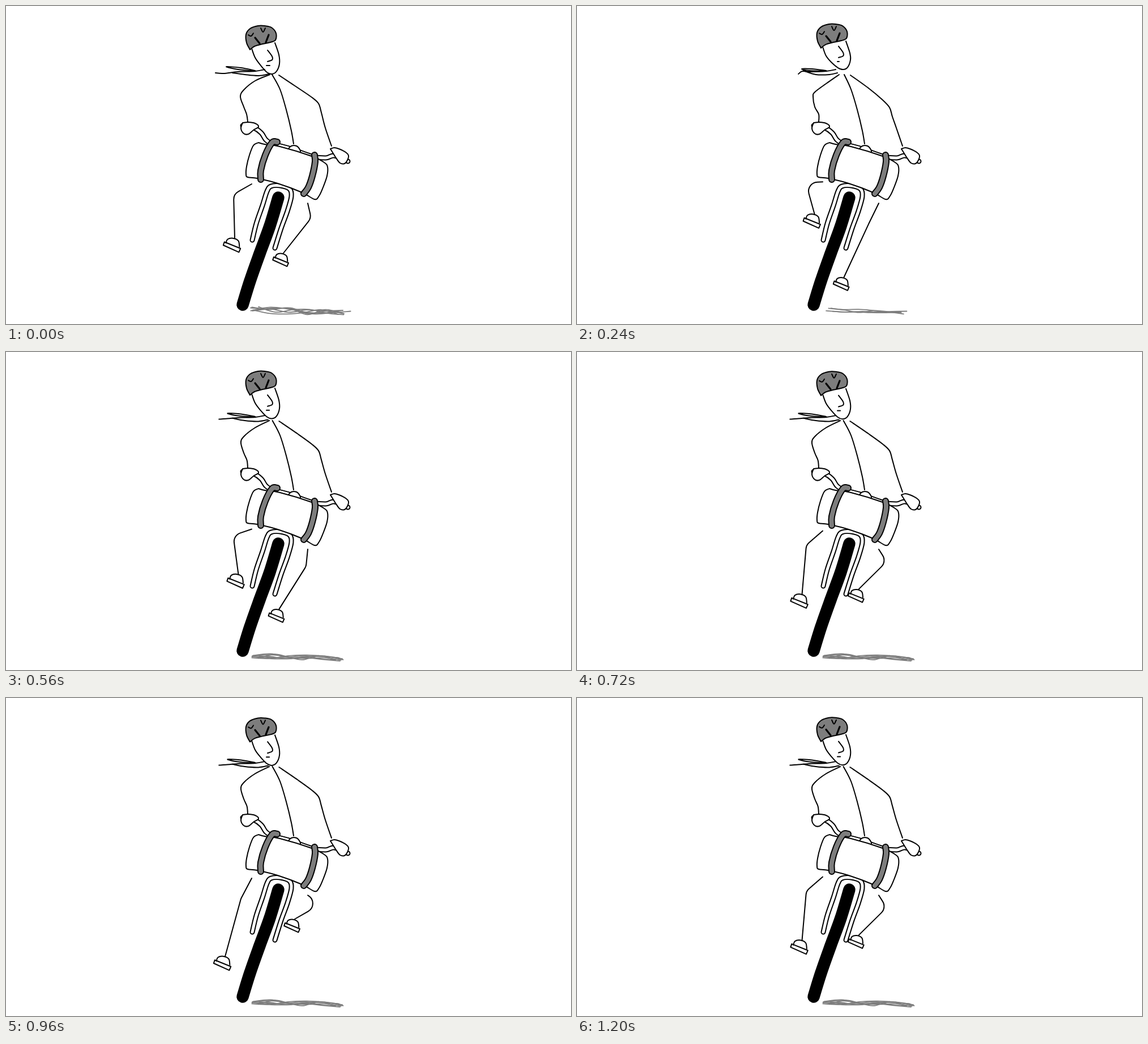
Animation, 998 px wide and 561 px high, one loop 1300 ms. Source, as an HTML page with a canvas:

```html
<!DOCTYPE html>
<html lang="en">
<head>
<meta charset="utf-8">
<title>Cyclist</title>
<style>
html, body { margin: 0; height: 100%; overflow: hidden; background: #fff; }
canvas { display: block; }
</style>
</head>
<body>
<canvas id="stage" width="998" height="561"></canvas>
<script>
const ctx = document.getElementById('stage').getContext('2d');
const GREY = '#7d7d7d';
const STEP = 80, LOOP = 1300, STEPS = 16;

// How far the redrawn lines drift from the first drawing, step by step.
const drift = [0, .3, 0, 1, .3, 1, 0, .3];

const points = s => s.split(' ').map(p => p.split(',').map(Number));

// Smooth path through all points of "x,y x,y ...".
function trace(p) {
  ctx.beginPath();
  ctx.moveTo(...p[0]);
  for (let i = 0; i < p.length - 1; i++) {
    const a = p[i], b = p[i + 1], prev = p[i - 1] || a, next = p[i + 2] || b;
    ctx.bezierCurveTo(
      a[0] + (b[0] - prev[0]) / 6, a[1] + (b[1] - prev[1]) / 6,
      b[0] - (next[0] - a[0]) / 6, b[1] - (next[1] - a[1]) / 6, b[0], b[1]);
  }
}

function stroke(width = 2, color = '#000') {
  ctx.lineWidth = width;
  ctx.strokeStyle = color;
  ctx.stroke();
}

function line(s, width, color) {
  trace(points(s));
  stroke(width, color);
}

function blob(s, fill = '#fff') {
  trace(points(s + ' ' + s.split(' ')[0]));
  ctx.fillStyle = fill;
  ctx.fill();
  stroke();
}

// Outlined band along a curve.
function tube(s, width, fill = '#fff') {
  line(s, width);
  line(s, width - 4, fill);
}

function random(seed) {
  return () => (seed = (seed * 16807) % 2147483647) / 2147483647;
}

function drawShadow(b) {
  const rnd = random(77 + b * 1000);
  const spread = 11 - 5 * b;
  for (let n = 0; n < 7 - 3 * b; n++) {
    const left = 432 + 8 * b + rnd() * 14, right = 612 - 22 * b - rnd() * 26;
    const p = [];
    for (let u = 0; u <= 1; u += .2)
      p.push([left + (right - left) * u, 536 + 5 * u + (rnd() - .5) * spread]);
    trace(p);
    stroke(1.8, GREY);
  }
}

function drawBody(b) {
  line(`${466 - 3 * b},121 440,${132 + 5 * b} 420,${148 + 4 * b} ${414 + 3 * b},160 420,178 ${425 + 2 * b},191 427,204`);
  line(`${470 + 2 * b},121 484,147 495,183 504,220 508,243`);
  line(`${482 + b},122 515,${144 + b} ${540 - b},${161 + 4 * b} 552,${172 + 7 * b} 557,${188 + 7 * b} 564,215 575,247`);
}

function drawScarf(b) {
  const low = `${370 + 21 * b},${118 + 2 * b}`, high = `${389 + 8 * b},${107 + 4 * b}`;
  line(`${low} ${384 + 14 * b},${119 - 4 * b} 410,116 440,115 457,112`);
  line(`440,114 415,${109 + 2 * b} ${high} 410,${112 + 2 * b} 440,115`);
  line(`400,${118 - 4 * b} 422,121 446,${123 - 2 * b} ${464 - 4 * b},${120 - 2 * b}`);
}

function drawHead(b, y) {
  ctx.save();
  ctx.translate(0, y);
  line(`434,75 440,91 450,${105 - 2 * b} 461,${117 - 5 * b} 470,${120 - 5 * b} 478,${115 - 4 * b} 483,${102 - 4 * b} 482,86 475,65`);
  blob('431,77 425,65 424,50 431,40 445,35 457,35 469,38 477,48 476,60 467,64 453,67 439,71', GREY);
  line('428,51 433,53 437,48');
  line('450,39 454,46 458,39');
  line('440,56 448,66', 3.2);
  line('464,51 459,64', 3.2);
  ctx.translate(0, -4 * b);
  line('462,78 470,89 470,95 462,98');
  line(`460,105 ${466 - 3 * b},105`);
  ctx.restore();
}

function drawBike() {
  tube('435,413 442,384 453,352 461,327 468,318 485,317 501,323 504,336 497,362 486,392 475,427', 9);
  tube('418,211 438,215 451,224 459,236 470,243 500,251 540,265 565,268 580,264 604,274', 9);
  blob('498,255 501,249 508,246 516,249 519,258');
  blob('446,241 437,246 430,263 425,283 424,297 427,302 444,304 480,313 523,329 545,341 553,335 560,320 567,300 568,284 562,276 540,265 484,248 457,244');
  tube('479,240 470,241 458,263 450,290 450,306', 12, GREY);
  tube('545,263 546,275 541,300 534,320 526,331', 12, GREY);
  blob('418,206 428,205 440,207 446,213 437,219 428,226 420,225 415,216');
  blob('573,252 580,250 588,252 600,258 605,264 603,272 598,278 590,277 583,268');
  line('481,338 466,388 448,437 431,485 418,527', 21.5);
}

function drawLeg(hip, knee, foot, size) {
  const ankle = [foot[0] + 4, foot[1] - 12];
  ctx.beginPath();
  ctx.moveTo(...hip);
  ctx.arcTo(...knee, ...ankle, 16);
  ctx.lineTo(...ankle);
  stroke();
  ctx.save();
  ctx.translate(...foot);
  ctx.scale(size, size);
  line('-12,-4 -9,-11 1,-13 11,-8 13,3', 2 / size);
  ctx.beginPath();
  points('-15,-6 -17,0 12,13 15,6').forEach(p => ctx.lineTo(...p));
  ctx.closePath();
  stroke(2 / size);
  ctx.restore();
}

function draw(now) {
  const i = Math.min(STEPS - 1, Math.floor(now % LOOP / STEP));
  const b = drift[i % drift.length];
  const h = -Math.sin(i / STEPS * 2 * Math.PI); // left pedal: -1 top, 1 bottom
  ctx.fillStyle = '#fff';
  ctx.fillRect(0, 0, 998, 561);
  ctx.lineCap = ctx.lineJoin = 'round';

  drawShadow(b);
  drawBody(b);
  drawScarf(b);
  drawHead(b, h - 2 * b);
  drawBike();
  drawLeg([434, 314 + 4 * h], [402 + 5 * h + 8 * h * h, 332 + 22 * h], [400 - 17 * h, 422 + 46 * h], .95);
  drawLeg([533, 348], [539 + 22 * h - 4 * h * h, 374 - 11 * h], [486 + 20 * h, 448 - 46 * h], .87);
  requestAnimationFrame(draw);
}
requestAnimationFrame(draw);
</script>
</body>
</html>
```
